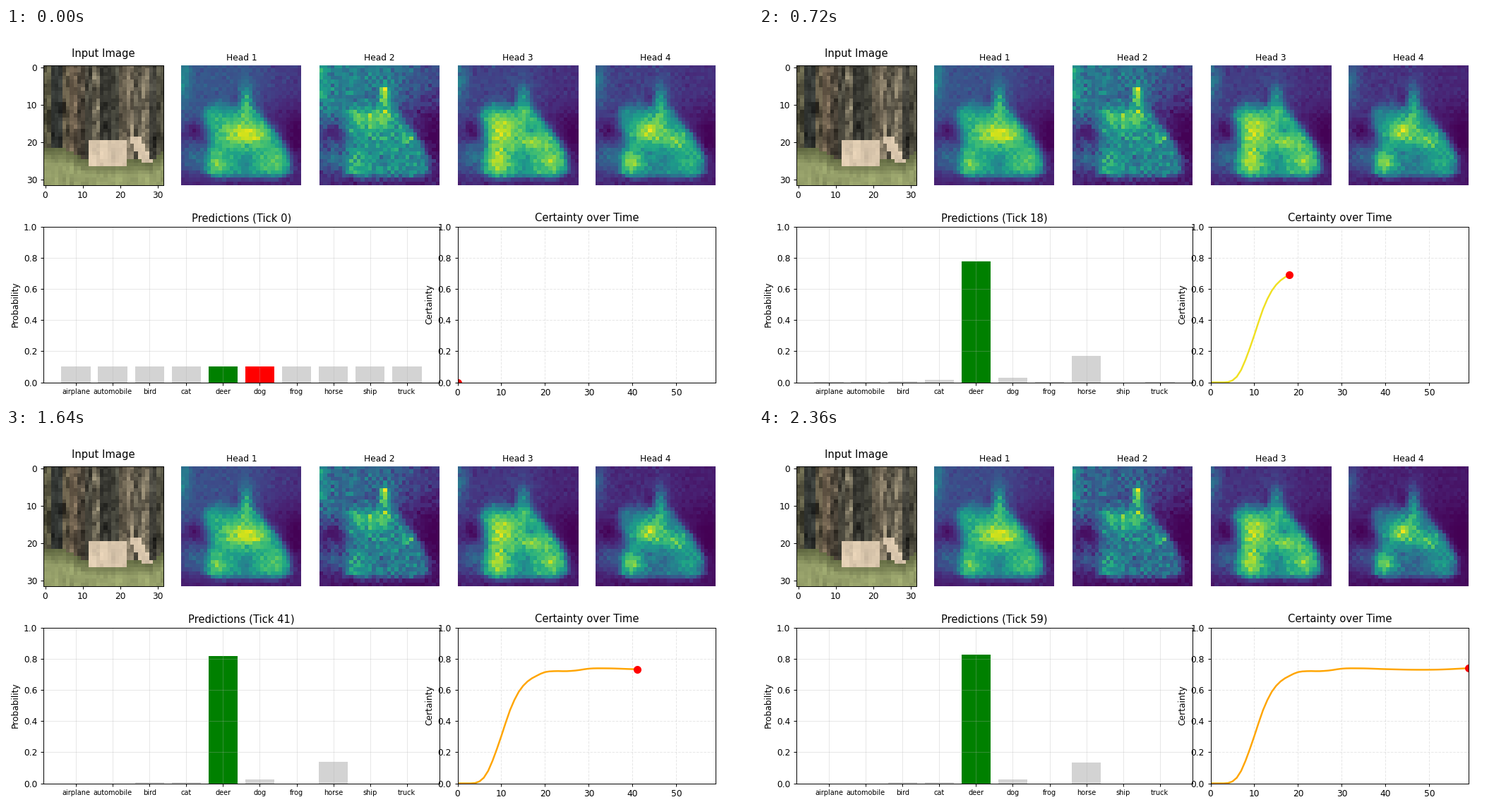
Animation, 1058 px wide and 529 px high, one loop 2400 ms. Source, as a matplotlib script:

```python
import numpy as np
import matplotlib.pyplot as plt
from matplotlib.animation import FuncAnimation

TICKS = 60
N = 32
DPI = 1058 / 12
row, col = np.mgrid[0:N, 0:N].astype(float)

plt.rcParams["font.family"] = "DejaVu Sans"


# ---------- curves ----------
def smooth(x, y, t):
    """Cubic Hermite curve through a few points."""
    x, y = np.array(x, float), np.array(y, float)
    m = np.gradient(y, x)
    i = np.clip(np.searchsorted(x, t, side="right") - 1, 0, len(x) - 2)
    h = x[i + 1] - x[i]
    s = (t - x[i]) / h
    return ((2 * s**3 - 3 * s**2 + 1) * y[i] + (s**3 - 2 * s**2 + s) * h * m[i]
            + (3 * s**2 - 2 * s**3) * y[i + 1] + (s**3 - s**2) * h * m[i + 1])


ticks = np.arange(TICKS)
certainty = smooth(
    [0, 3, 4, 5, 6, 7, 8, 10, 12, 14, 16, 18, 20, 22, 25, 27, 30, 34, 40, 47, 52, 59],
    [0, 0, .002, .012, .036, .08, .145, .303, .47, .588, .654, .689, .714, .72,
     .72, .724, .736, .738, .733, .729, .73, .739], ticks)
certainty = np.clip(certainty, 0, 1)

NAMES = ["airplane", "automobile", "bird", "cat", "deer",
         "dog", "frog", "horse", "ship", "truck"]
KEYS = [0, 10, 18, 27, 34, 47, 59]
PROBS = {
    "airplane": [.1, .018, .001, 0, 0, 0, 0],
    "automobile": [.1, .024, .001, 0, 0, 0, 0],
    "bird": [.1, .057, .007, .003, .003, .007, .006],
    "cat": [.1, .07, .016, .007, .007, .011, .009],
    "deer": [.1, .466, .777, .805, .82, .818, .824],
    "dog": [.1, .09, .028, .022, .022, .027, .024],
    "frog": [.1, .015, .001, 0, 0, 0, 0],
    "horse": [.1, .226, .172, .16, .14, .138, .135],
    "ship": [.1, .006, 0, 0, 0, 0, 0],
    "truck": [.1, .024, .001, 0, 0, 0, 0],
}


def pace(t):
    """Early on the probabilities follow the certainty curve."""
    c = certainty
    if t < 10:
        return 10 * np.sqrt(c[t] / c[10])
    if t < 18:
        return 10 + 8 * (c[t] - c[10]) / (c[18] - c[10])
    return t


def probs(t):
    return [np.interp(pace(t), KEYS, PROBS[n]) for n in NAMES]


# ---------- input picture ----------
def picture():
    rng = np.random.default_rng(4)
    img = np.zeros((N, N, 3))
    trunks = [(0, (92, 90, 68)), (2, (48, 51, 48)), (5, (92, 84, 66)),
              (7, (116, 101, 82)), (9, (80, 72, 60)), (11, (70, 68, 58)),
              (13, (112, 106, 88)), (15, (54, 54, 48)), (18, (66, 66, 57)),
              (20, (100, 92, 76)), (22, (124, 114, 95)), (24, (92, 87, 73)),
              (26, (116, 108, 90)), (28, (64, 63, 56)), (30, (80, 78, 64))]
    for start, color in trunks:
        img[:, start:] = color
    grain = rng.normal(0, 1, (N + 2, N))
    grain = (grain[:-2] + grain[1:-1] + grain[2:]) / 3
    img *= (1 + .36 * grain)[..., None]

    shade = (row > 16) & (col > 7) & (col < 12)
    img[shade] *= .75
    edge = np.interp(col, [0, 5, 9, 12, 22, 28, 31], [22, 22, 24, 25, 25, 25, 23])
    grass = row >= edge
    mix = np.clip((row - edge) / 4, 0, 1)[..., None]
    green = np.array([100, 108, 68]) * (1 - mix) + np.array([150, 160, 106]) * mix
    green = green * (1 + .07 * grain)[..., None]
    img[grass] = green[grass]

    body = (row >= 20) & (row <= 26) & (col >= 12) & (col <= 21)
    lean = 22.5 + .55 * np.maximum(row - 20, 0)
    side = (row >= 19) & (row <= 25) & (col >= lean) & (col <= lean + 3)
    tan = np.array([219, 200, 174]) * (1 + .06 * grain)[..., None]
    img[body | side] = tan[body | side]
    return np.clip(img, 0, 255).astype(np.uint8)


# ---------- attention heads ----------
def blob(r, c, sr, sc, amp):
    return amp * np.exp(-((row - r) / sr)**2 - ((col - c) / sc)**2)


def sigmoid(x):
    return 1 / (1 + np.exp(-x))


ROWS = [9, 11, 13, 18, 21, 24, 28, 30, 31.5]
LEFT = [8, 6, 5.5, 7, 7, 6, 6, 9, 14]
RIGHT = [19, 20, 21, 25, 27, 28.5, 28.5, 26, 20]
body = (sigmoid(1.6 * (col - np.interp(row, ROWS, LEFT)))
        * sigmoid(1.8 * (np.interp(row, ROWS, RIGHT) - col))
        * sigmoid(1.1 * (row - 10.5)) * sigmoid(2.2 * (29.3 - row)))


def head(seed, sky, fill, noise, blobs):
    rng = np.random.default_rng(seed)
    fade = sigmoid(.5 * (13 - row + .25 * (14 - col)))
    right = sigmoid(.45 * (col - 22))
    back = .09 + (sky - .09) * fade * (1 - .55 * right)
    back += blob(4, 0, 6, 2.2, .2) + blob(24, 3, 4.5, 4.5, .26)
    back -= blob(17, 3, 2.6, 2, .12) + blob(18, 30, 6, 4, .09)
    v = back * (1 - body) + fill * body
    v += blob(9, 16.8, 4.6, 1.7, .33) + blob(9, 14, 2, 1.2, -.1)
    for b in blobs:
        v += blob(*b)
    grain = rng.normal(0, 1, (N, N)) + .5 * np.where((row + col) % 2, 1, -1)
    v += grain * noise * (.25 + .75 * np.clip(v / .5, 0, 1))
    return np.clip(v, .01, 1)


HEADS = [
    head(1, .27, .58, .035,
         [(18, 16.5, 3.2, 6, .38), (12.5, 8, 3, 3, .06), (26, 9, 3.5, 2.6, .22),
          (25, 24, 4, 4, .14), (25.5, 16.5, 4, 2, -.09)]),
    head(2, .42, .5, .07,
         [(14, 12, 3.4, 4.5, .24), (13, 9, 1.3, 1.1, .2), (6.4, 16.5, 1, 1, .4),
          (15, 17, 3, 3, .14), (19, 23, 1.4, 1.8, .25), (26, 9, 3, 2.4, .18),
          (26, 16, 3.5, 2, -.06)]),
    head(3, .2, .62, .04,
         [(17, 11, 5, 4, .28), (25.5, 10, 4, 3, .26), (20, 20, 2, 4.5, .2),
          (25, 24.5, 3.8, 3.2, .2), (26, 17, 3.5, 1.6, -.1)]),
    head(4, .19, .53, .04,
         [(17, 14, 3.2, 4, .38), (25.5, 9, 3, 2.4, .36), (19.5, 21, 2.4, 3.5, .24),
          (25, 25, 3.5, 3, .12), (26, 16, 3.5, 3, -.08)]),
]
DRIFT = [.12, .38, .2, .42]


def heat(k, t):
    """Weak areas sink slowly while the peaks stay."""
    return HEADS[k] ** (1 + DRIFT[k] * t / (TICKS - 1))


# ---------- figure ----------
fig = plt.figure(figsize=(12, 6), dpi=DPI, facecolor="white")
gs = fig.add_gridspec(2, 5, height_ratios=[1, 1.3], left=.05, right=.95,
                      top=.9, bottom=.05, wspace=.15, hspace=.3)

ax = fig.add_subplot(gs[0, 0])
ax.imshow(picture(), interpolation="nearest")
ax.set_title("Input Image", pad=10)
ax.set_xticks([0, 10, 20, 30])
ax.set_yticks([0, 10, 20, 30])

maps = []
for k in range(4):
    ax = fig.add_subplot(gs[0, k + 1])
    maps.append(ax.imshow(heat(k, 0), cmap="viridis", vmin=0, vmax=1,
                          interpolation="nearest"))
    ax.set_title(f"Head {k + 1}", fontsize=10)
    ax.axis("off")

pred = fig.add_subplot(gs[1, :3])
bars = pred.bar(range(10), probs(0), color="lightgray")
pred.set_xlim(-.89, 9.89)
pred.set_ylim(0, 1)
pred.set_xticks(range(10), NAMES, fontsize=8)
pred.set_ylabel("Probability")
pred.grid(alpha=.3)
title = pred.set_title("Predictions (Tick 0)")

cert = fig.add_subplot(gs[1, 3:])
cert.set_xlim(0, TICKS - 1)
cert.set_ylim(0, 1)
cert.set_xticks(range(0, 60, 10))
cert.set_xlabel("Tick")
cert.set_ylabel("Certainty")
cert.set_title("Certainty over Time")
cert.grid(alpha=.3, linestyle="--")
line, = cert.plot([], [], lw=2)
dot, = cert.plot([], [], "ro", markersize=8)


def update(t):
    for k, m in enumerate(maps):
        m.set_data(heat(k, t))
    for name, bar, p in zip(NAMES, bars, probs(t)):
        bar.set_height(p)
        wrong = name == "dog" and t < 3
        bar.set_facecolor("green" if name == "deer" else "red" if wrong else "lightgray")
    title.set_text(f"Predictions (Tick {t})")
    line.set_data(ticks[:t + 1], certainty[:t + 1])
    line.set_color("#dfe023" if t < 14 else "#f0e022" if t < 23 else "orange")
    dot.set_data([t], [certainty[t]])
    return [*maps, *bars, title, line, dot]


anim = FuncAnimation(fig, update, frames=TICKS, interval=40, repeat=True,
                     repeat_delay=0, blit=False)
plt.show()
```
